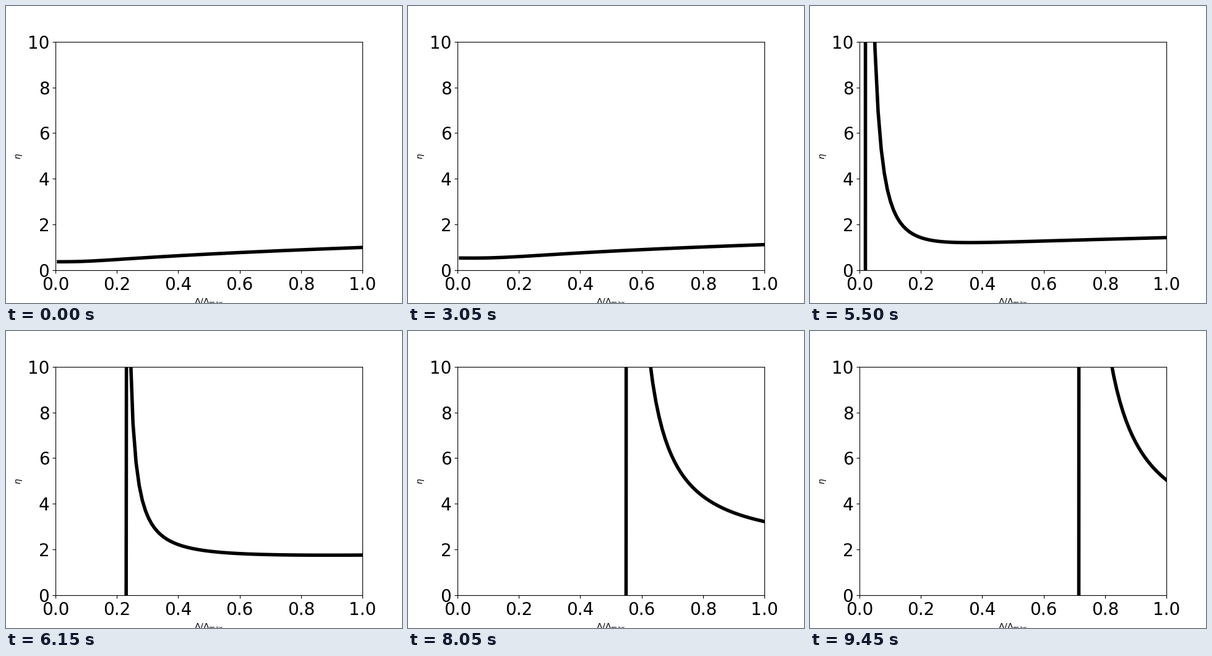
Animation of 640 by 480 pixels, one loop 9.5 s. Source, as a matplotlib script:

```python
import numpy as np
import matplotlib.pyplot as plt
from matplotlib.animation import FuncAnimation

FRAMES = 190
INTERVAL = 50
SLOW = 99          # last frame of the slow linear sweep

x = np.linspace(0, 1, 100)[1:]

# Flow with unit coupling at the cutoff, its residue and its pole position.
base = (x**2.8 + 0.1406**2.8) ** (0.5 / 2.8)
residue = (x**4 + 0.15**4) ** 0.325 + 1.8 * x**2 * np.exp(-(x / 0.14) ** 2)
pole = 0.7 * (1 - x * (np.tanh(5 * x) + 0.04 * (1 - x)))


def cutoff_coupling(i):
    """Linear growth up to 1.2, then exponential growth."""
    if i <= SLOW:
        return 1 + 0.2 * i / SLOW
    return 1.2 * np.exp(0.01595 * (i - SLOW))


def flow(i):
    inverse = 1 / cutoff_coupling(i)
    return base + residue * (1 / (inverse - pole) - 1 / (1 - pole))


fig, ax = plt.subplots(figsize=(6.4, 4.8), dpi=100)
ax.set_xlim(0, 1)
ax.set_ylim(0, 10)
ax.tick_params(labelsize=20)
ax.set_xlabel(r"$\Lambda/\Lambda_{max}$")
ax.set_ylabel(r"$\eta$")
line, = ax.plot(x, flow(0), color="black", lw=4)


def update(i):
    line.set_ydata(flow(i))
    return line,


anim = FuncAnimation(fig, update, frames=FRAMES, interval=INTERVAL,
                     repeat=True, repeat_delay=0)
plt.show()
```
